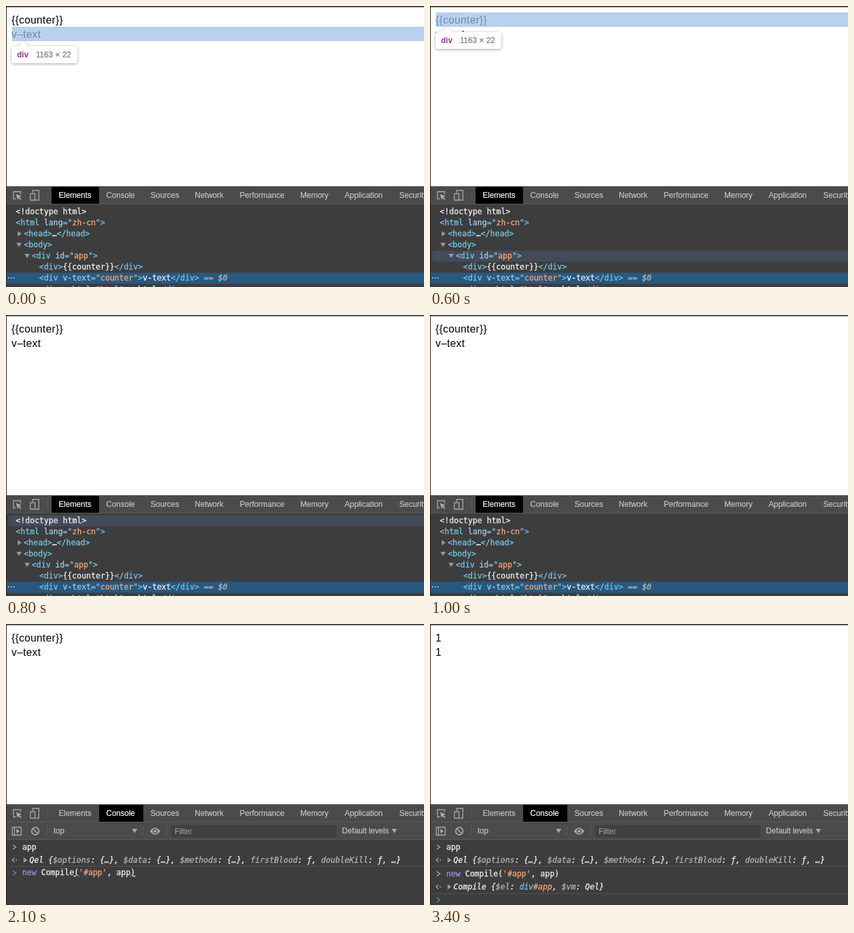
An HTML page that plays this animation: 642 by 432 pixels, repeating every 3.5 s.

```html
<!DOCTYPE html>
<html lang="en">
<head>
<meta charset="utf-8">
<title>Template compile demo</title>
<style>
html, body { margin: 0; width: 100%; height: 100%; overflow: hidden; background: #fff; }
svg { display: block; }
text, tspan { fill: currentColor; stroke: currentColor; }
text { white-space: pre; font: 12px "Liberation Sans", Arial, sans-serif; stroke-width: .2; }
.page { font-size: 16px; letter-spacing: .4px; stroke-width: 0; }
.code { font: 12px "DejaVu Sans Mono", Menlo, monospace; stroke-width: .3; }
.bold { font-weight: 700; stroke-width: 0; }
.it { font-style: italic; }
.w, .u { color: #f0f0f0; }
.t { color: #79c3e6; }
.a { color: #a5c9e6; }
.v { color: #f5a679; }
.k { color: #a58ae0; }
.g { color: #b4b4b4; }
.u { text-decoration: underline; }
.line { fill: none; stroke: #aaa; stroke-width: 1.3; }
</style>
</head>
<body>
<svg id="stage" width="642" height="432" viewBox="0 0 642 432"></svg>
<script>
const LOOP = 3500;
const stage = document.getElementById('stage');
const esc = s => s.replace(/&/g, '&amp;').replace(/</g, '&lt;');
const rect = (x, y, w, h, fill, more = '') =>
  `<rect x="${x}" y="${y}" width="${w}" height="${h}" fill="${fill}" ${more}/>`;
const path = (d, attrs = 'class="line"') => `<path d="${d}" ${attrs}/>`;
const text = (x, y, s, color, more = '') =>
  `<text x="${x}" y="${y}" color="${color}" ${more}>${esc(s)}</text>`;

// Each part starts with the letter of its colour class.
const code = (x, y, parts, more = '') => `<text x="${x}" y="${y}" class="code ${more}">` +
  parts.map(p => `<tspan class="${p[0]}">${esc(p.slice(1))}</tspan>`).join('') + '</text>';
const right = (x, y) => path(`M${x} ${y - 4}l6 4l-6 4z`, 'fill="#999"');
const down = (x, y, fill = '#999') => path(`M${x} ${y - 3}h8l-4 6.5z`, `fill="${fill}"`);
const chevron = (y, color) => path(`M10.5 ${y - 3.5}l4.5 3.5l-4.5 3.5`,
  `fill="none" stroke="${color}" stroke-width="1.5"`);
const returned = y => path(`M13 ${y - 3}l-3.5 3l3.5 3`) +
  `<circle cx="15.8" cy="${y}" r="1.1" fill="#aaa"/>` + right(27, y);
const rule = y => rect(1, y, 641, 1, '#525252');
const divider = (x, y) => rect(x, y, 1, 16, '#585858');

function page(lines) {
  return rect(0, 0, 642, 278, '#fff') +
    lines.map((s, i) => text(8.5, 27 + 22 * i, s, '#000', 'class="page"')).join('');
}

function highlight(x, y, h, tag, size) {
  const whole = x === 1;
  const left = whole ? 2.5 : 8.5, w = whole ? 110 : 101, top = y + h + 8;
  return rect(x, y, 642 - x, h, 'rgba(155,192,232,.72)') +
    `<g style="filter:drop-shadow(0 1px 2px rgba(0,0,0,.35))">` +
    rect(left, top, w, 26, '#fff', 'rx="3"') +
    path(`M${left + 10} ${top}l8 -8l8 8z`, 'fill="#fff"') + '</g>' +
    text(left + 8.5, top + 17, tag, '#8a3b8c', 'class="bold"') +
    text(left + (whole ? 46.5 : 37.5), top + 17, size, '#777', 'word-spacing=".6"');
}

function tabs(active) {
  const names = [['Elements', 81], ['Console', 154], ['Sources', 222], ['Network', 290],
    ['Performance', 359], ['Memory', 452], ['Application', 520], ['Security', 604]];
  return rect(0, 277, 642, 28, '#4b4b4b') + rect(0, 277, 642, 1, '#5a5a5a') +
    (active ? rect(143, 278, 68, 26, '#000') : rect(70, 278, 73, 26, '#000')) +
    rect(0, 304, 642, 1, '#5a5a5a') +
    names.map(([s, x], i) => text(x, 295, s, i === active ? '#fff' : '#c4c4c4')).join('') +
    path('M15 296.5h-3.5v-11h11v4') +
    path('M15.5 289l8.5 3.5l-3.5 1.3l3 3l-1.4 1.4l-3 -3l-1.4 3z', 'fill="#aaa"') +
    path('M41 287v-3.5h9.5v15h-5M37.5 288.5h7v10h-7z') +
    divider(63, 283);
}

function elements(hover) {
  const y = i => 320 + 17 * i;
  const div = ['t<div ', 'av-text', 't="', 'vcounter', 't">', 'wv-text', 't</div>'];
  return rect(0, 305, 642, 127, '#3d3d3d') +
    (hover >= 0 ? rect(3, y(hover) - 12, 645, 17, '#434b5a', 'rx="5"') : '') +
    rect(1, y(6) - 12, 641, 17, '#29587f') +
    code(15, y(0), ['w<!doctype html>']) +
    code(15, y(1), ['t<html ', 'alang', 't="', 'vzh-cn', 't">']) +
    right(18, 350) + code(27.5, y(2), ['t<head>', 'w…', 't</head>']) +
    down(16, 367) + code(27.5, y(3), ['t<body>']) +
    down(28.5, 384) + code(39.5, y(4), ['t<div ', 'aid', 't="', 'vapp', 't">']) +
    code(51, y(5), ['t<div>', 'w{{counter}}', 't</div>']) +
    code(51, y(6), div) + code(304, y(6), ['g== $0'], 'it') +
    code(51, y(7) + 1, ['t<div ', 'av-html', 't="', 'vhtml', 't">', 'wv-html', 't</div>']) +
    [4, 8, 12].map(x => `<circle cx="${x}" cy="418" r="1.1" fill="#b5c5d5"/>`).join('');
}

function consoleBar() {
  return rect(0, 305, 642, 27, '#4b4b4b') + rect(0, 331, 642, 1, '#5a5a5a') +
    path('M9.5 312.5h14v12h-14zM13 312.5v12') + path('M16 315l5 3.5l-5 3.5z', 'fill="#aaa"') +
    '<circle class="line" cx="45" cy="318.5" r="5.6" style="stroke-width:1.7"/>' +
    path('M41 314.5l8 8', 'stroke="#aaa" stroke-width="1.7"') +
    divider(63, 310) + text(73, 322, 'top', '#c4c4c4') + down(193.5, 318, '#aaa') +
    divider(210, 310) +
    path('M221 318.5q8 -10.5 16 0q-8 10.5 -16 0z', 'fill="#aaa"') +
    '<circle cx="229" cy="318.5" r="3" fill="#aaa" stroke="#4b4b4b" stroke-width="1.4"/>' +
    divider(247, 310) + rect(254, 309, 254, 19, '#404040') +
    text(259, 323, 'Filter', '#999') +
    text(516, 322, 'Default levels', '#c4c4c4') + down(592.5, 318, '#aaa');
}

function consoleLog(done, matched, caret) {
  const paren = matched ? 'u' : 'w';
  const call = ['knew ', 'wCompile', paren + '(', "v'#app'", 'w, app', paren + ')'];
  const blue = '#4c8fe0';
  let out = rect(0, 332, 642, 100, '#3d3d3d') +
    chevron(343, '#aaa') + code(25, 347, ['wapp']) + returned(363) +
    code(36, 367, ['wQel {', 'g$options', 'w: {…}, ', 'g$data', 'w: {…}, ', 'g$methods',
      'w: {…}, ', 'gfirstBlood', 'w: ƒ, ', 'gdoubleKill', 'w: ƒ, …}'], 'it') +
    rule(372);
  if (done) {
    out += chevron(384, '#aaa') + code(25, 388, call) + returned(404) +
      code(36, 408, ['wCompile {', 'g$el', 'w: ', 'tdiv', 'v#app', 'w, ', 'g$vm', 'w: Qel}'], 'it') +
      rule(414) + chevron(424, blue);
  } else {
    out += chevron(383, blue) + code(25, 386, call);
  }
  return out + (caret ? rect(done ? 25 : 198, done ? 418 : 376, 1, 13, '#f0f0f0') : '');
}

function scene(t) {
  const done = t >= 2200;
  let out = page(done ? ['1', '1'] : ['{{counter}}', 'v–text']);
  if (t < 500) out += highlight(9, 32, 22, 'div', '1163 × 22');
  else if (t < 700) out += highlight(9, 10, 22, 'div', '1163 × 22');
  else if (t < 800) out += highlight(1, 2, 60, 'html', '1179 × 60');

  if (t < 1100) {
    const hover = t < 500 ? -1 : t < 600 ? 5 : t < 700 ? 4 : t < 800 ? 1 : t < 900 ? 0 : -1;
    out += elements(hover) + tabs(0);
  } else {
    const caret = [[1600, 2100], [2200, 2600], [3000, 3400]].some(([on, off]) => t >= on && t < off);
    out += consoleBar() + consoleLog(done, t >= 2100 && !done, caret) + tabs(1);
  }
  return out + rect(0, 0, 642, 2, '#4a4a4a') + rect(0, 0, 1, 432, '#1c1c1c');
}

let shown = -1;
const start = performance.now();
function frame(now) {
  const step = Math.floor(Math.max(0, now - start) % LOOP / 100);
  if (step !== shown) stage.innerHTML = scene((shown = step) * 100);
  requestAnimationFrame(frame);
}
frame(start);
</script>
</body>
</html>
```
